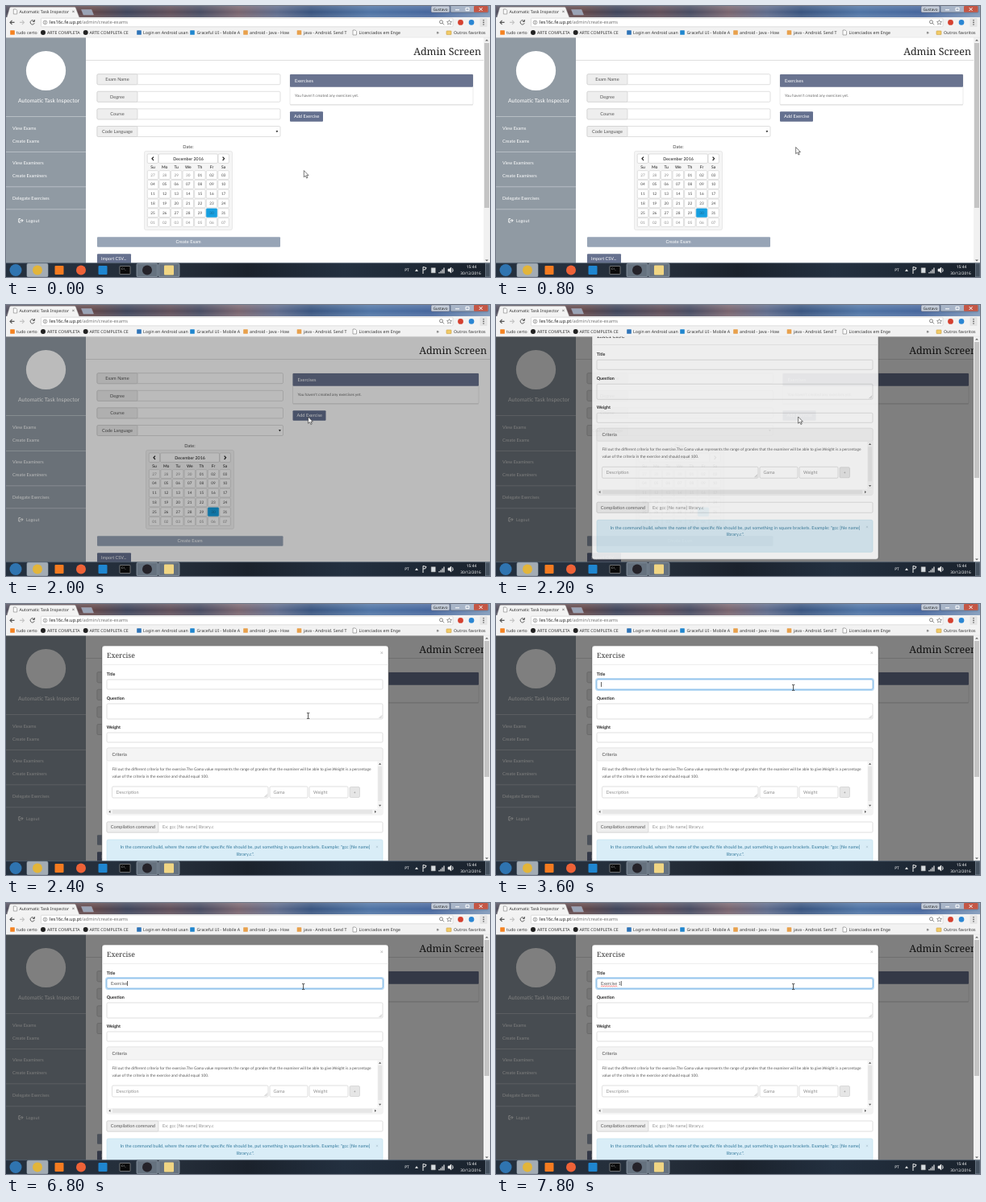
Write an HTML page that moves like this. It is 600 px wide and 337 px high and loops after 8 s.

```html
<!DOCTYPE html>
<html lang="en">
<head>
<meta charset="utf-8">
<title>Create exams</title>
<style>
html, body { margin: 0; width: 100%; height: 100%; overflow: hidden; background: #fff; }
svg { display: block; width: 100vw; height: 100vh; text-rendering: geometricPrecision; }
text { white-space: pre; font-family: Lato, sans-serif; }
.ui { font-family: "Noto Sans", sans-serif; }
.serif { font-family: "Noto Serif", serif; }
.bold { font-weight: 700; }
</style>
</head>
<body>
<svg id="stage" viewBox="0 0 600 337" xmlns="http://www.w3.org/2000/svg"></svg>
<script>
const LOOP = 8000, STEP = 200;
const APP = 'Automatic Task Inspector';

const rect = (x, y, w, h, fill, stroke = 'none', r = 0, extra = '') =>
  `<rect x="${x}" y="${y}" width="${w}" height="${h}" fill="${fill}" stroke="${stroke}" stroke-width=".6" rx="${r}" ${extra}/>`;
const disc = (x, y, r, fill) => `<circle cx="${x}" cy="${y}" r="${r}" fill="${fill}"/>`;
const path = (d, stroke, width = 1, fill = 'none') =>
  `<path d="${d}" fill="${fill}" stroke="${stroke}" stroke-width="${width}"/>`;
// y is the vertical middle of the line
const text = (x, y, str, size, fill, cls = '', anchor = 'start') =>
  `<text x="${x}" y="${y + size * .35}" font-size="${size}" fill="${fill}" class="${cls}" text-anchor="${anchor}">${str}</text>`;
const mid = (x, y, str, size, fill, cls = '') => text(x, y, str, size, fill, cls, 'middle');
const field = (x, y, w, h, fill = '#fff') => rect(x, y, w, h, fill, '#c9c9c9', 1.5);
const group = (id, inner) => `<g id="${id}">${inner}</g>`;

function gradient(id, dir, stops) {
  const marks = stops.map(([o, c]) => `<stop offset="${o}" stop-color="${c}"/>`).join('');
  return `<linearGradient id="${id}" x2="${dir === 'h' ? 1 : 0}" y2="${dir === 'h' ? 0 : 1}">${marks}</linearGradient>`;
}

function scrollbar(top, thumbEnd) {
  return rect(592, top, 8, 320 - top, '#f1f1f1') +
    rect(593, top + 7, 6, thumbEnd - top - 7, '#c4c4c4') +
    path(`M594 ${top + 4.5}l2-2 2 2zM594 315.5l2 2 2-2z`, 'none', 0, '#666');
}

function sidebar() {
  const links = [['View Exams', 152], ['Create Exams', 168], ['View Examiners', 195],
    ['Create Examiners', 211], ['Delegate Exercises', 239]];
  return rect(0, 39, 99, 281, '#909aa3') +
    disc(49.5, 80.5, 24.6, '#fff') +
    mid(53, 118, APP, 6.9, '#fff') +
    [137, 181, 224.5, 252.5].map(y => rect(0, y, 99, .7, '#c9ced3')).join('') +
    links.map(([s, y]) => text(8, y, s, 5.55, '#fff')).join('') +
    path('M18 264.6h-2.2v4.4h2.2M17.3 266.8h3.5M19.3 265l1.8 1.8-1.8 1.8', '#fff', .9) +
    text(25, 267, 'Logout', 5.4, '#fff');
}

function calendar(cx) {
  const x0 = cx - 44, dx = 14.6, dy = 11.8;
  let out = rect(cx - 54.5, 180.5, 109, 98, '#f5f5f5', '#ddd', 2) +
    field(x0 - 6.8, 184, 13.4, 11.5) + field(x0 + 7.3, 184, 73.2, 11.5) + field(x0 + 81, 184, 13.4, 11.5) +
    path(`M${x0 + 1} 187.6l-2 2.2 2 2.2M${x0 + 86.6} 187.6l2 2.2-2 2.2`, '#222', 1.2) +
    mid(cx, 189.8, 'December 2016', 5.3, '#111');
  'Su Mo Tu We Th Fr Sa'.split(' ').forEach((d, i) => {
    out += mid(x0 + i * dx, 200, d, 5, '#111');
  });
  for (let i = 0; i < 42; i++) {
    const x = x0 + i % 7 * dx, y = 210 + Math.floor(i / 7) * dy;
    const day = i < 4 ? 27 + i : (i - 4) % 31 + 1;
    const today = i === 33, inMonth = i > 3 && i < 35;
    out += rect(x - 6.7, y - 5.3, 13.4, 10.7, today ? '#169fe0' : '#fff', today ? '#169fe0' : '#cfcfcf', 1) +
      mid(x, y, String(day).padStart(2, '0'), 4.7, today ? '#1c6a90' : inMonth ? '#444' : '#888');
  }
  return out;
}

// The layout widens when the window scrollbar is hidden
function page(width) {
  const grow = (width - 592) / 8;
  const right = 340 + 3.5 * grow, cx = 226 + 2 * grow;
  const px = 352 + 3.5 * grow, pw = 227 + 3.5 * grow;
  const labels = ['Exam Name', 'Degree', 'Course', 'Code Language'];
  return rect(0, 39, 600, 281, '#fff') + sidebar() +
    rect(99, 67, width - 99, .8, '#d8d8d8') +
    text(589 + 7 * grow, 56.4, 'Admin Screen', 12.5, '#222', 'serif', 'end') +
    labels.map((s, i) => {
      const y = 91.2 + i * 21.6;
      return field(113, y - 6.5, right - 113, 13) + field(113, y - 6.5, 50, 13, '#eee') +
        mid(138, y, s, 5.6, '#555');
    }).join('') +
    path(`M${right - 5.5} 155h2.8l-1.4 2.4z`, 'none', 0, '#333') +
    mid(cx, 175, 'Date:', 5.6, '#444') + calendar(cx) +
    rect(113, 287.3, right - 113, 12.4, '#97a4b6', 'none', 1) +
    mid(cx, 293.5, 'Create Exam', 5.6, '#fff') +
    rect(113, 308.3, 42, 13, '#66718f', 'none', 1) +
    text(118, 314.5, 'Import CSV...', 5.5, '#fff') +
    rect(px, 86, pw, 37.5, '#ddd', 'none', 1) +
    rect(px, 85, pw, 37.5, '#fff', '#ddd', 1) +
    rect(px, 85, pw, 15.7, '#69738f', 'none', 1) +
    text(px + 6, 93, 'Exercises', 5.7, '#fff') +
    text(px + 6, 111.2, "You haven't created any exercises yet.", 4.8, '#666') +
    rect(px, 131.3, 41, 12.4, '#64708f', 'none', 1) +
    text(px + 5, 137.5, 'Add Exercise', 5.6, '#fff');
}

function modal() {
  const label = (y, s) => text(124.7, y, s, 5.35, '#222', 'bold');
  const hint = (x, y, s) => text(x, y, s, 5.5, '#8c8c8c');
  const grip = (x, y) => path(`M${x - 3.5} ${y}l3.5-3.5M${x - 1.7} ${y}l1.7-1.7`, '#888', .5);
  return rect(118, 52, 357, 290, '#000', 'none', 3, 'opacity=".18"') +
    rect(119, 52, 355, 290, '#fff', '#888', 3) +
    text(125, 64, 'Exercise', 8.7, '#333', 'serif') +
    mid(465.8, 61, '×', 7, '#aaa') + rect(119, 75, 355, .7, '#e5e5e5') +
    label(87, 'Title') + field(125, 94, 342, 12) +
    label(117, 'Question') + field(125, 124, 342, 19) + grip(466, 142) +
    label(153, 'Weight') + field(125, 160, 342, 12) +
    rect(125, 179, 342, 83, '#fff', '#ddd', 2) +
    rect(125, 179, 342, 16, '#f4f4f4', '#ddd', 2) +
    text(131.5, 187, 'Criteria', 5.6, '#444') +
    rect(460.5, 195.5, 6.3, 59, '#f3f3f3') + rect(125.4, 255, 341, 6.6, '#f3f3f3') +
    rect(132, 255.8, 322, 5, '#e6e6e6') + rect(461.2, 202, 5, 43, '#e6e6e6') +
    path('M462 199.8l1.6-2 1.6 2zM462 249.8l1.6 2 1.6-2zM129.4 256.7l-2 1.6 2 1.6zM457 256.7l2 1.6-2 1.6z', 'none', 0, '#555') +
    text(131.5, 205, 'Fill out the different criteria for the exercise.The Gama value represents the range of grandes that the examiner will be able to give.Weight is a percentage', 4.8, '#555') +
    text(131.5, 214, 'value of the criteria in the exercise and should equal 100.', 4.8, '#555') +
    field(131.5, 227, 193.5, 14) + grip(324, 240) + hint(136.5, 234, 'Description') +
    field(327, 227, 47, 14) + hint(331.5, 234, 'Gama') +
    field(376, 227, 48, 14) + hint(381, 234, 'Weight') +
    field(426, 227.5, 12.5, 13, '#e6e6e6') + mid(432.2, 234, '+', 5, '#888') +
    field(125, 271, 342, 13) + field(125, 271, 64, 13, '#eee') +
    text(129.8, 277.5, 'Compilation command', 5.6, '#555') +
    hint(194, 277.5, 'Ex: gcc [file name] library.c') +
    rect(125, 293, 342, 40, '#d9edf7', '#bce0ec', 2) +
    mid(296.5, 302.5, 'In the command build, where the name of the specific file should be, put something in square brackets. Example: "gcc [file name]', 5.55, '#31789b') +
    mid(296.5, 311, 'library.c".', 5.55, '#31789b') + mid(460, 302, '×', 6, '#a5bcc8') +
    group('focus',
      rect(124, 93, 344, 14, 'none', '#66afe9', 2.6, 'opacity=".45" style="stroke-width:1.8"') +
      rect(125, 94, 342, 12, '#fff', '#5aa7e6', 1.8) +
      '<text id="typed" x="130" y="102" font-size="5.6" fill="#555"></text>' +
      '<path id="spell" fill="none" stroke="#e33" stroke-width=".6"/>' +
      rect(0, 97, .7, 6, '#222', 'none', 0, 'id="caret"'));
}

function browser() {
  const square = (x, c) => rect(x - 2.8, 30.2, 5.6, 5.6, c, 'none', .6);
  const dot = (x, c) => disc(x, 33, 3, c);
  const marks = [
    [square, 8, '#f58220', 13, 'tudo certo'], [dot, 46, '#222', 51, 'ARTE COMPLETA'],
    [dot, 98.7, '#222', 103.5, 'ARTE COMPLETA CE'], [square, 165, '#2f74b8', 170, 'Login en Android usan'],
    [square, 231, '#1f86cf', 236.5, 'Graceful UI - Mobile A'], [square, 297, '#e8a04c', 302, 'android - Java - How'],
    [square, 363.5, '#e8a04c', 369, 'java - Android. Send T']];
  return rect(0, 0, 600, 15, 'url(#aero)') + rect(0, 0, 600, 15, 'url(#shine)') +
    path('M1 14.5l3.5-12q.5-1.2 2-1.2h78q1.5 0 2 1.2l4.5 12z', '#888', .4, '#f3f3f3') +
    path('M9.3 4h3l1.4 1.4v4.6h-4.4z', '#777', .6, '#fff') +
    text(16.5, 6.8, APP, 5.2, '#333', 'ui') + mid(83.5, 6.8, '×', 6, '#555', 'ui') +
    path('M93.5 4.5h12.5l2.5 6.5h-12.5z', '#aab', .5, '#9aa3b5') +
    rect(527, 0, 23, 8, '#c3ccd9', '#667', 1.5) + mid(538.5, 4, 'Gustavo', 4.7, '#222', 'ui') +
    rect(551, -2, 47, 10, '#a8b5c8', '#4d5868', 1.5) + rect(580, 0, 17.5, 7.7, '#c45645', 'none', 1) +
    path('M557 4.8h5M570 2.3h4v3.4h-4zM586.6 2l4 4M590.6 2l-4 4', '#fff', 1) +
    rect(0, 14, 600, 25.2, '#f2f2f2') +
    rect(43.5, 15.2, 510.5, 10.6, '#fff', '#ccc', 1) +
    path('M10.5 20.4h-5.5M7.5 17.9l-2.5 2.5 2.5 2.5', '#555', 1.1) +
    path('M17 20.4h5.5M20 17.9l2.5 2.5-2.5 2.5', '#c4c4c4', 1.1) +
    path('M34.8 18.8a2.6 2.6 0 1 0 .4 2.4M35.4 17v2.4h-2.4', '#555', 1) +
    '<circle cx="48.5" cy="20.4" r="2.3" fill="none" stroke="#666" stroke-width=".6"/>' + rect(48.2, 19, .6, 2.8, '#666') +
    text(54, 20.4, 'les16c.fe.up.pt<tspan fill="#777">/admin/create-exams</tspan>', 5.75, '#222', 'ui') +
    '<circle cx="539.5" cy="19.8" r="2" fill="none" stroke="#666" stroke-width=".8"/>' +
    path('M541 21.3l2 2', '#666', .9) +
    path('M549.5 17.4l.9 2 2.1.2-1.6 1.4.5 2.1-1.9-1.1-1.9 1.1.5-2.1-1.6-1.4 2.1-.2z', '#666', .6) +
    disc(563.5, 20.4, 3.4, '#d5402f') + disc(577, 20.4, 3.3, '#2a86d3') +
    rect(587.5, 15, 9, 11, '#e4e4e4', 'none', 1) +
    [17.8, 20.4, 23].map(y => disc(592, y, .8, '#555')).join('') +
    marks.map(([icon, x, c, tx, s]) => icon(x, c) + text(tx, 33, s, 5.25, '#333', 'ui')).join('') +
    path('M430 30h3l1.5 1.5v4.5h-4.5z', '#777', .6, '#fff') + text(437.5, 33, 'Licenciados em Enge', 5.25, '#333', 'ui') +
    text(533.5, 32.6, '»', 6.5, '#333', 'ui') + rect(546, 31, 6, 4.6, '#f2cb67', '#c79b3d', .5) +
    text(555, 33, 'Outros favoritos', 5.2, '#333', 'ui') + rect(0, 38.8, 600, .5, '#ddd');
}

function taskbar() {
  return rect(0, 319.5, 600, 18, 'url(#bar)') + rect(0, 319.5, 600, .6, '#5f6e7f') +
    disc(12, 328.5, 7.5, '#2f74b0') +
    [26, 162, 189].map(x => rect(x, 320.3, 26, 16.4, x === 26 ? '#a3acb4' : '#66727f', '#a7b4bf', 1.5)).join('') +
    disc(39, 328.5, 6, '#e2b53a') +
    rect(60.5, 323, 11, 11, '#f47b20', 'none', 1) + disc(93, 328.5, 6, '#ee6237') +
    rect(114.5, 323, 11, 11, '#1f86d0', 'none', 1) +
    rect(141, 323.5, 13, 10, '#0a0a0a', '#aaa', .5) + text(143, 327, 'C:\\_', 3.4, '#ddd', 'ui') +
    disc(175, 328.5, 6, '#25232a') +
    rect(196, 322.5, 12, 12, '#f0d583', 'none', 1) +
    mid(497, 328.5, 'PT', 4.9, '#fff', 'ui') +
    path('M507 330l2-3 2 3z', 'none', 0, '#ddd') +
    path('M517 333v-8.5l4 1-1 2.2-3 .4', '#eee', 1) + rect(527, 325.5, 5.5, 6.5, '#d6dce0', '#777', .6) +
    path('M537 332.5v-1.5M539 332.5v-3M541 332.5v-5M543 332.5v-7', '#eee', 1.2) +
    path('M548 327h1.7l2.2-2v7l-2.2-2H548zM553.5 326q1.6 2.5 0 5', '#eee', .6, '#eee') +
    mid(577, 324.4, '15:44', 4.9, '#fff', 'ui') + mid(576, 332.6, '30/12/2016', 4.8, '#fff', 'ui') +
    rect(594.5, 320, 5.5, 17, '#45515e', '#8796a3');
}

const cursors =
  group('arrow', path('M0 0v8.2l1.9-1.7 1.4 3 1.3-.6-1.3-2.9h2.5z', '#222', .6, '#fff')) +
  group('hand', path('M-.8 0q.8-.9 1.5 0v3.2l3 .7q1 .3.9 1.3l-.5 2.6-.8 1.7h-3.6l-2.3-3.6q.3-1 1.8.2z', '#222', .6, '#fff')) +
  group('beam', path('M-1.6-3.5h1.2l.4.5.4-.5h1.2M0-3v6M-1.6 3.5h1.2l.4-.5.4.5h1.2', '#222', .8));

document.getElementById('stage').innerHTML = '<defs>' +
  gradient('aero', 'h', [[0, '#4c4a5a'], [.18, '#5e4244'], [.25, '#3a4057'], [.34, '#5c4a55'], [.4, '#43475e'],
    [.48, '#75606a'], [.56, '#5a6788'], [.63, '#34507c'], [.75, '#4a70a2'], [.88, '#41629a'], [1, '#7d97b8']]) +
  gradient('shine', 'v', [[0, '#ffffff30'], [.5, '#ffffff08'], [1, '#ffffff28']]) +
  gradient('bar', 'h', [[0, '#24303e'], [.35, '#252e3a'], [.5, '#1b222c'], [.7, '#233040'], [1, '#1a222c']]) + '</defs>' +
  group('plain', page(592) + scrollbar(39, 251)) +
  group('wide', page(600) + rect(0, 39, 600, 281, '#000', 'none', 0, 'id="shade"')) +
  group('dialog', modal()) +
  group('dialogBar', scrollbar(39, 215)) +
  browser() + taskbar() + group('pointer', cursors);

const el = id => document.getElementById(id);
const show = (id, on) => el(id).setAttribute('display', on ? 'inline' : 'none');
const clamp = v => Math.max(0, Math.min(1, v));
const span = (t, a, b) => clamp((t - a) / (b - a));
const smooth = p => p * p * (3 - 2 * p);

const CLICK = 1920, OPEN = 2070, FOCUS = 3400, SPELL = 7000;
const TITLE = 'Exercise 1';
const KEYS = [4000, 4400, 4700, 5050, 6000, 6200, 6400, 6600, 7400, 7600];

let zigzag = 'M130 103.8';
for (let i = 0; i < 14; i++) zigzag += `l1.45 ${i % 2 ? .8 : -.8}`;
el('spell').setAttribute('d', zigzag);

function movePointer(t) {
  const reach = smooth(span(t, 200, 1500)), lift = smooth(span(t, 2500, 3300));
  const x = 369.3 + 5.3 * reach - 6 * lift;
  const y = 204.6 - 65.6 * reach - 35 * lift;
  const shape = t >= 2400 ? 'beam' : t < CLICK && y < 144 ? 'hand' : 'arrow';
  ['arrow', 'hand', 'beam'].forEach(s => show(s, s === shape));
  el('pointer').setAttribute('transform', `translate(${x} ${y})`);
}

function type(t) {
  const done = KEYS.filter(k => k <= t);
  const typed = el('typed');
  typed.textContent = TITLE.slice(0, done.length);
  const last = done.length ? done[done.length - 1] : FOCUS;
  const end = done.length ? typed.getComputedTextLength() : 0;
  el('caret').setAttribute('x', 130 + end);
  show('caret', (t - last) % 1000 < 500);
  show('spell', t >= SPELL);
}

function render(ms) {
  const t = Math.floor(ms % LOOP / STEP) * STEP;
  const open = t >= OPEN, focused = t >= FOCUS;
  show('plain', t < CLICK);
  show('wide', t >= CLICK);
  el('shade').setAttribute('opacity', .5 * span(t, CLICK, OPEN));
  show('dialog', open);
  show('dialogBar', open);
  const slide = 1 - (1 - span(t, OPEN, OPEN + 300)) ** 2;
  el('dialog').setAttribute('transform', `translate(0 ${-80 * (1 - slide)})`);
  el('dialog').setAttribute('opacity', span(t, OPEN, OPEN + 150));
  show('focus', focused);
  if (focused) type(t);
  movePointer(t);
}

const start = performance.now();
function tick() {
  render(performance.now() - start);
  requestAnimationFrame(tick);
}
render(0);
tick();
</script>
</body>
</html>
```
